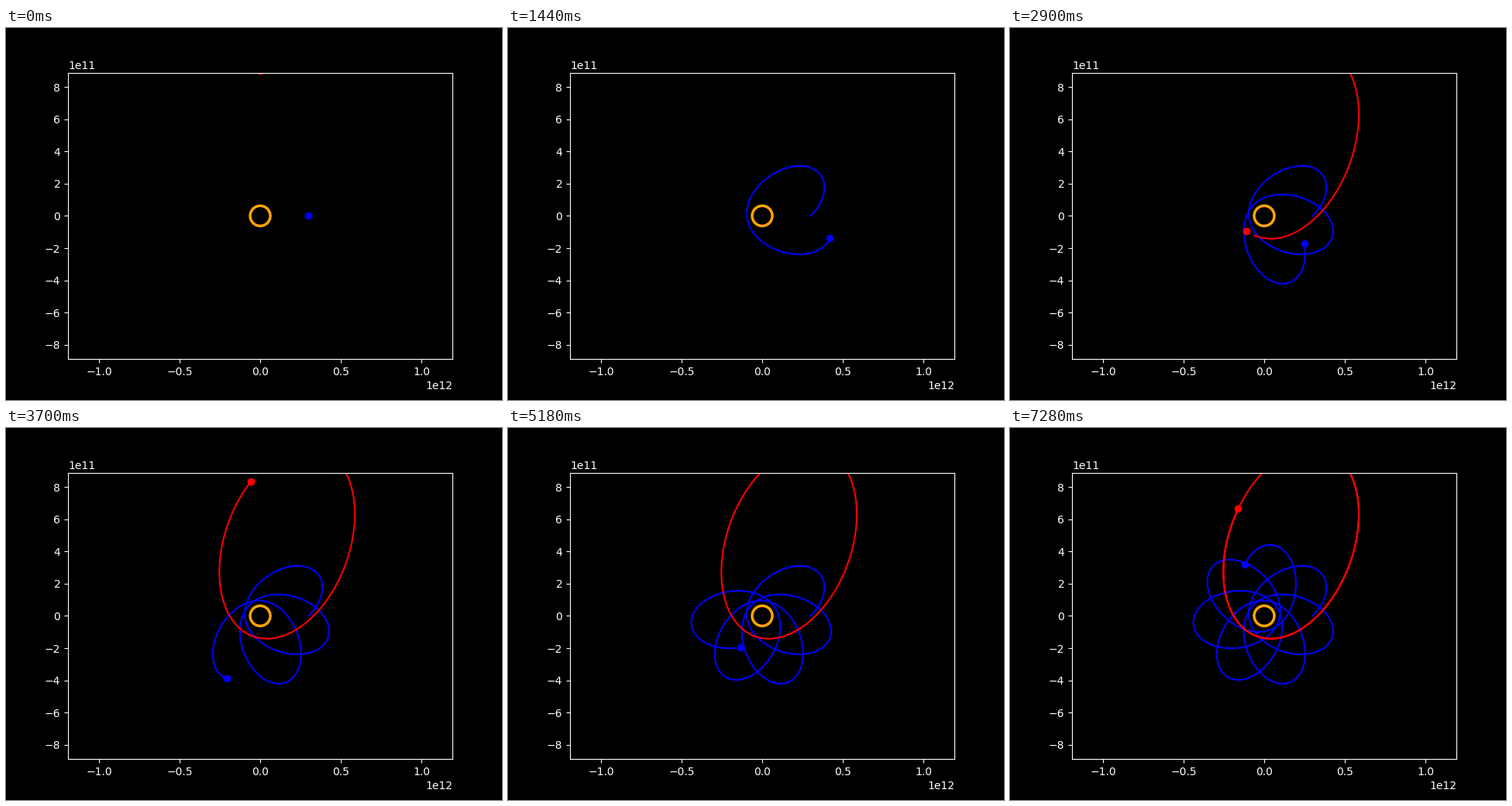
A matplotlib script that plays this animation: 640 px wide and 480 px high, repeating every 7300 ms.

```python
import numpy as np
import matplotlib.pyplot as plt
from matplotlib.animation import FuncAnimation

FRAMES = 365
INTERVAL = 20
SCALE = 208e-12  # pixels per metre

plt.style.use("dark_background")


def orbit(a, e, start, rate, time_e=None):
    """Radius and unwrapped true anomaly per frame; start and rate in degrees."""
    time_e = e if time_e is None else time_e
    mean = np.radians(start + rate * np.arange(FRAMES))
    ecc = mean + time_e * np.sin(mean)
    for _ in range(30):
        ecc -= (ecc - time_e * np.sin(ecc) - mean) / (1 - time_e * np.cos(ecc))
    b = e / (1 + np.sqrt(1 - e * e))
    anomaly = ecc + 2 * np.arctan2(b * np.sin(ecc), 1 - b * np.cos(ecc))
    return a * (1 - e * np.cos(ecc)), anomaly


def to_xy(r, angle):
    return r * np.cos(angle), r * np.sin(angle)


# Inner planet: a rosette whose far point slips back on every turn
r, nu = orbit(2.689e11, 0.645, 67.77, 6.5065, time_e=0.578)
inner = to_xy(r, np.radians(34.6) + 0.8561 * (nu - np.pi + 0.05 * np.sin(nu)))

# Outer planet: a closed ellipse, run clockwise
r, nu = orbit(6.163e11, 0.78, 89.9, 1.879)
outer = to_xy(r, np.radians(249.7) - nu)

fig, ax = plt.subplots(figsize=(6.4, 4.8), dpi=100)
fig.set_facecolor("black")
ax.set_facecolor("black")
ax.set_xlim(-248 / SCALE, 248 / SCALE)
ax.set_ylim(-184.8 / SCALE, 184.8 / SCALE)

star = plt.Circle((0, 0), 13 / SCALE, fill=False, color="orange", lw=2.5, zorder=3)
ax.add_patch(star)

bodies = []
for path, color in ((inner, "blue"), (outer, "red")):
    trail, = ax.plot([], [], color=color, lw=1.5)
    dot, = ax.plot([], [], "o", color=color, ms=6)
    bodies.append((path, trail, dot))


def update(i):
    for (x, y), trail, dot in bodies:
        trail.set_data(x[:i], y[:i])
        dot.set_data(x[i:i + 1], y[i:i + 1])
    return [artist for body in bodies for artist in body[1:]]


anim = FuncAnimation(fig, update, frames=FRAMES, interval=INTERVAL,
                     repeat=True, repeat_delay=0)
plt.show()
```
